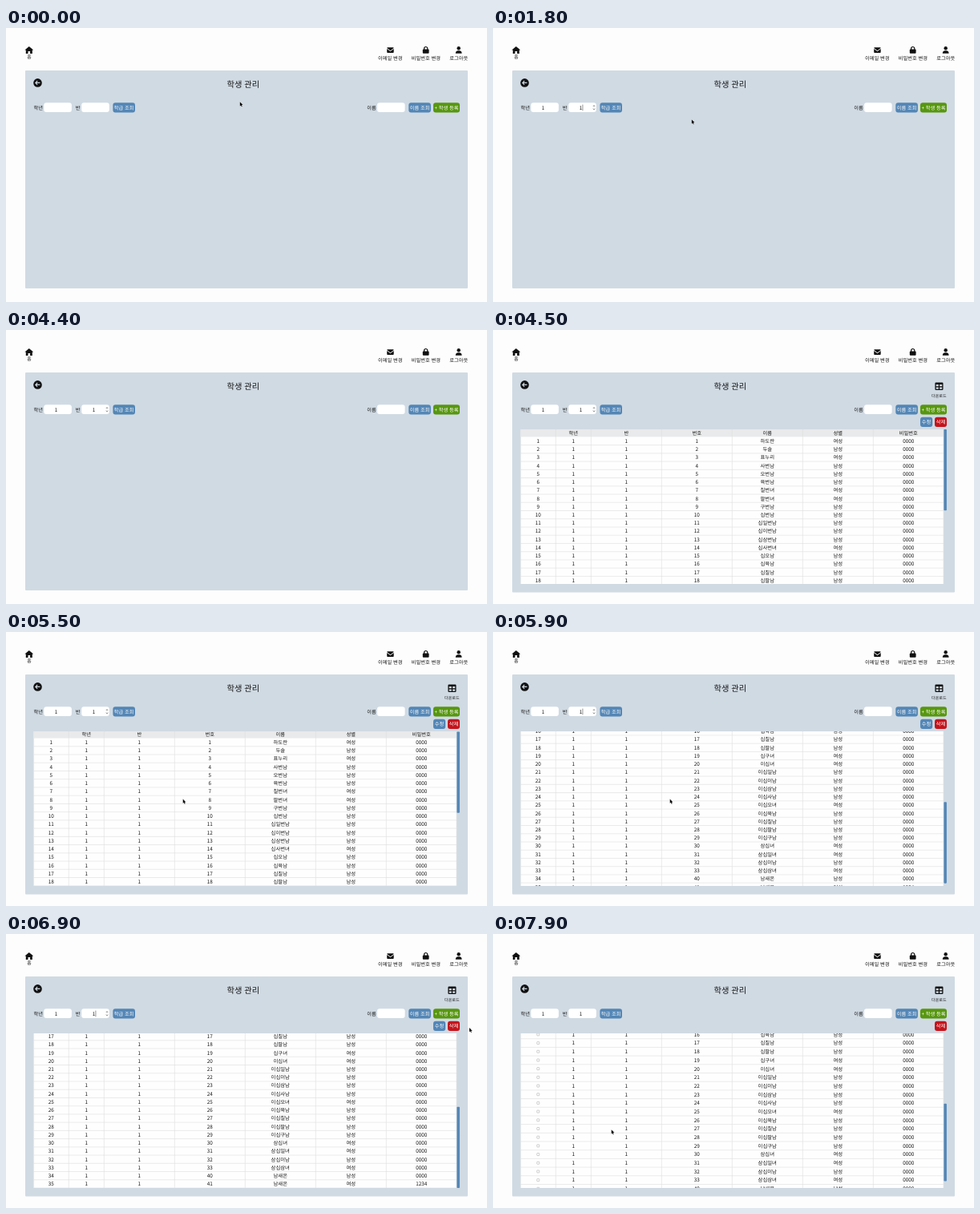
Write an HTML page that moves like this. It is 600x342 px and loops after 8 s.

```html
<!DOCTYPE html>
<html lang="ko">
<head>
<meta charset="utf-8">
<title>학생 관리</title>
<style>
  html, body { margin: 0; width: 100%; height: 100%; overflow: hidden; background: #fdfdfd; }
  svg { display: block; width: 100vw; height: 100vh; }
  text {
    font-family: "Noto Sans CJK KR", "Noto Sans CJK", "Noto Sans", sans-serif;
    font-weight: 500; fill: #161616; text-rendering: geometricPrecision;
  }
</style>
</head>
<body>
<svg id="stage" viewBox="0 0 600 342">
  <clipPath id="view"><rect x="34.3" y="124" width="528" height="193"/></clipPath>
  <rect id="panel" x="24" y="53" width="552" height="272" rx="1" fill="#d0dae3"/>

  <g id="icons" fill="#111">
    <path d="M28.8 22.9 34.2 27.6H32.8V31.9H30.1V29H27.5V31.9H24.8V27.6H23.4Z"/>
    <path d="M475.2 25.1Q475.2 24.2 476.1 24.2H482.8Q483.7 24.2 483.7 25.1L479.5 28.2ZM475.2 26.1 479.5 29.3 483.7 26.1V30Q483.7 31 482.8 31H476.1Q475.2 31 475.2 30Z"/>
    <rect x="519.8" y="26.6" width="7.8" height="5.2" rx="1"/>
    <path d="M521.6 27V25.6a2.1 2.1 0 0 1 4.2 0V27" fill="none" stroke="#111" stroke-width="1.2"/>
    <circle cx="564.7" cy="25.3" r="2.2"/>
    <path d="M560.8 31.8Q560.8 28.2 564 28.2H565.4Q568.6 28.2 568.6 31.8Z"/>
    <circle cx="39.5" cy="68.4" r="5.3"/>
    <path d="M42.4 68.4H37M39.2 66 36.8 68.4 39.2 70.8" fill="none" stroke="#d0dae3" stroke-width="1.1"/>
  </g>

  <g id="form"></g>

  <g id="results">
    <path d="M552.6 65.5H560.3Q561.5 65.5 561.5 66.7V73.8Q561.5 75 560.3 75H552.6Q551.4 75 551.4 73.8V66.7Q551.4 65.5 552.6 65.5ZM552.7 68.1V70.2H555.8V68.1ZM557.1 68.1V70.2H560.2V68.1ZM552.7 71.5V73.7H555.8V71.5ZM557.1 71.5V73.7H560.2V71.5Z" fill="#111" fill-rule="evenodd"/>
    <g id="actions"></g>
    <g clip-path="url(#view)">
      <rect x="34.3" y="124" width="528" height="193" fill="#fefefe"/>
      <g id="header"></g>
      <g id="rows"></g>
      <path id="columns" fill="none" stroke="#dedede" stroke-width=".6"/>
    </g>
    <rect id="thumb" x="562.4" width="3.5" rx=".8" fill="#5386b6"/>
  </g>

  <path id="caret" d="M111.9 95.6V103.2" stroke="#222" stroke-width=".5"/>
  <path id="cursor" d="M0 0V5.2L1.2 4.2 2 6.1 2.9 5.7 2.1 3.9H3.7Z" fill="#0a0a0a" stroke="#fff" stroke-width=".4" paint-order="stroke"/>
</svg>

<script>
const LOOP = 8000, TABLE_AT = 4500, EDIT_AT = 7300;
const BLUE = "#5386b6", GREEN = "#57970f", RED = "#c4141c";
const VIEW = { top: 124, height: 193 };
const CENTERS = [56.3, 100.3, 166.3, 254.3, 342.3, 430.3, 518.3];
const $ = id => document.getElementById(id);

function add(parent, tag, attrs) {
  const node = document.createElementNS("http://www.w3.org/2000/svg", tag);
  for (const key in attrs) node.setAttribute(key, attrs[key]);
  return parent.appendChild(node);
}
// Text centred on (x, y)
function label(parent, string, x, y, size = 6.25, fill = "#161616") {
  const node = add(parent, "text", { x, y: y + size * 0.37, "font-size": size, "text-anchor": "middle" });
  node.style.fill = fill;
  node.textContent = string;
  return node;
}
function button(parent, string, x, y, width, fill) {
  const group = add(parent, "g", {});
  add(group, "rect", { x, y, width, height: 12.2, rx: 3, fill });
  label(group, string, x + width / 2, y + 6, 6.25, "#fff");
  return group;
}
const show = (node, visible) => node.setAttribute("visibility", visible ? "inherit" : "hidden");

// Navigation and search form
const form = $("form");
label(form, "홈", 28.8, 36, 5.8);
label(form, "이메일 변경", 479.3, 37.6);
label(form, "비밀번호 변경", 523.8, 37.6);
label(form, "로그아웃", 564.7, 37.6);
label(form, "학생 관리", 295.8, 70.2, 10.3);
label(form, "학년", 40.2, 99.2);
label(form, "반", 89.6, 99.2);
label(form, "이름", 456, 99.2);
for (const x of [47.3, 94.2, 463])
  add(form, "rect", { x, y: 93.3, width: 34.6, height: 11.8, rx: 3, fill: "#fff" });
button(form, "학급 조회", 133.4, 93.2, 27.6, BLUE);
button(form, "이름 조회", 502.3, 93.2, 27.6, BLUE);
button(form, "+ 학생 등록", 533, 93.2, 33, GREEN);
const grade = label(form, "1", 62.4, 99.2);
const room = label(form, "1", 109.4, 99.2);
const spinner = add(form, "path", {
  d: "M124.9 98 126 96.6 127.1 98M124.9 100.6 126 102 127.1 100.6",
  fill: "none", stroke: "#444", "stroke-width": 0.6
});

// Result table
label($("results"), "다운로드", 556.3, 82.2, 5.05);
const editButton = button($("actions"), "수정", 533, 108.7, 15.2, BLUE);
button($("actions"), "삭제", 551, 108.7, 15, RED);

const names = ("하도란 두솔 표누리 사번남 오번남 육번남 칠번녀 팔번녀 구번남 십번남 십일번남 십이번남 십삼번남 십사번녀 " +
  "십오남 십육남 십칠남 십팔남 십구녀 이십녀 이십일남 이십이남 이십삼남 이십사남 이십오녀 이십육남 이십칠남 " +
  "이십팔남 이십구남 삼십녀 삼십일녀 삼십이남 삼십삼녀 남새온 남새온").split(" ");
const women = [1, 3, 35];

const headerFill = add($("header"), "rect", { x: 34.3, y: 0, width: 528, height: 9.4, fill: "#e9eaeb" });
["", "학년", "반", "번호", "이름", "성별", "비밀번호"]
  .forEach((title, i) => label($("header"), title, CENTERS[i], 4.7));

const rows = names.map((name, i) => {
  const n = i + 1;
  const group = add($("rows"), "g", {});
  const line = add(group, "path", { stroke: "#dedede", "stroke-width": 0.6 });
  const female = name.endsWith("녀") || women.includes(n);
  const cells = [n, 1, 1, n < 34 ? n : n + 6, name, female ? "여성" : "남성", n === 35 ? "1234" : "0000"];
  const texts = cells.map((cell, c) => label(group, cell, CENTERS[c], 0, 6.35));
  const box = add(group, "rect", {
    x: 54.8, y: -1.5, width: 3, height: 3, rx: 0.5, fill: "#fff", stroke: "#888", "stroke-width": 0.4
  });
  return { group, line, number: texts[0], box };
});
$("columns").setAttribute("d",
  [34.6, 78.3, 122.3, 210.3, 298.3, 386.3, 474.3, 562].map(x => `M${x} 124V317`).join(""));

// Pointer: [time, x, y]
const path = [
  [0, 291.8, 92.2], [100, 291.8, 92.2], [700, 66, 98], [1700, 66, 98], [1800, 247.8, 114.2], [2200, 604, 126],
  [4700, 420, 160], [5150, 220.7, 208.6], [6300, 220.7, 208.6], [6800, 578, 117], [6920, 578, 117],
  [7200, 541, 114], [7350, 541, 114], [7850, 147.7, 244.2], [LOOP, 147.7, 244.2]
];
const between = (t, a, b) => t >= a && t < b;

function pointerAt(t) {
  const i = path.findIndex(point => point[0] > t);
  const [t0, x0, y0] = path[i - 1], [t1, x1, y1] = path[i];
  const u = (t - t0) / (t1 - t0), k = u * u * (3 - 2 * u);
  return [x0 + (x1 - x0) * k, y0 + (y1 - y0) * k];
}

function drawTable(t) {
  const editing = t >= EDIT_AT;
  const pitch = editing ? 10.69 : 10.235, head = editing ? 10.3 : 9.4;
  const content = head + rows.length * pitch;
  const u = Math.min(1, Math.max(0, (t - 5500) / 600));
  const scroll = 174.6 * (1 - (1 - u) ** 3);
  const top = VIEW.top - scroll;

  $("header").setAttribute("transform", `translate(0 ${top})`);
  headerFill.setAttribute("height", head);
  rows.forEach(({ group, line, number, box }, i) => {
    group.setAttribute("transform", `translate(0 ${top + head + (i + 0.5) * pitch})`);
    line.setAttribute("d", `M34.3 ${pitch / 2}H562.3`);
    show(number, !editing);
    show(box, editing);
  });
  $("thumb").setAttribute("y", VIEW.top + scroll * VIEW.height / content);
  $("thumb").setAttribute("height", VIEW.height ** 2 / content);
  show(editButton, !editing);
}

function draw(t) {
  const loaded = t >= TABLE_AT;
  $("panel").setAttribute("height", loaded ? 274.6 : 272);
  $("results").style.display = loaded ? "" : "none";
  if (loaded) drawTable(t);

  show(grade, t >= 1000);
  show(room, t >= 1600);
  show(spinner, between(t, 1400, EDIT_AT));
  // The caret blinks every half second from the last key press
  show($("caret"), between(t, 1600, EDIT_AT) && (t - 1600) % 1000 < 500);

  const [x, y] = pointerAt(t);
  $("cursor").setAttribute("transform", `translate(${x} ${y})`);
  show($("cursor"), !between(t, 1000, 1750) && !between(t, 2200, 4700));
}

const start = performance.now();
function tick() {
  draw((performance.now() - start) % LOOP);
  requestAnimationFrame(tick);
}
tick();
</script>
</body>
</html>
```
